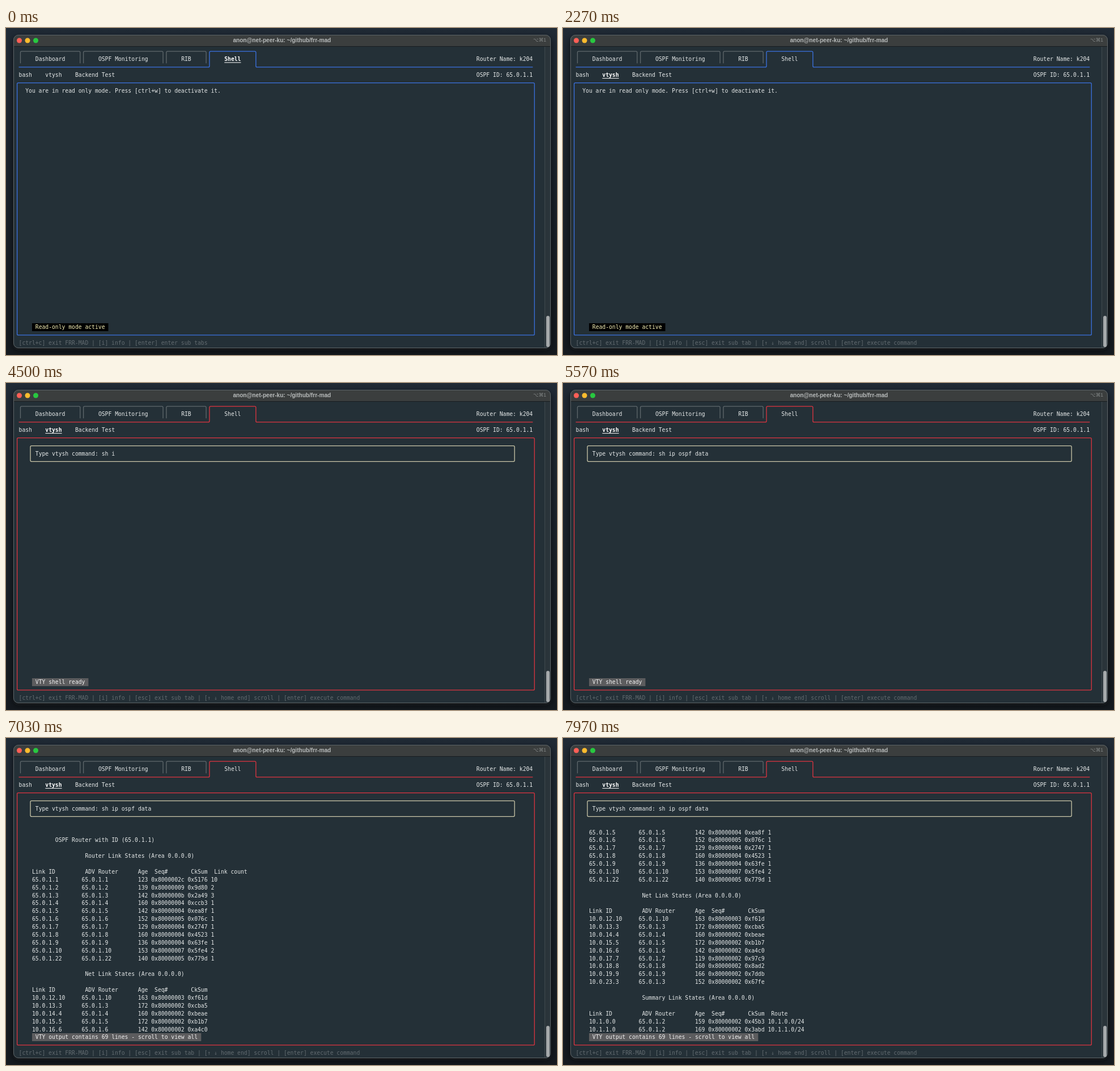
Write an HTML page that moves like this. It is 972 px wide and 576 px high and loops after 8 s.

```html
<!DOCTYPE html>
<html lang="en">
<head>
<meta charset="utf-8">
<title>Router shell</title>
<style>
html, body { margin: 0; width: 100%; height: 100%; overflow: hidden; background: #1b2229; }
svg { display: block; width: 100vw; height: 100vh; }
text { white-space: pre; fill: #e6e9e9; font: 9.717px "DejaVu Sans Mono", monospace; }
.active { font-weight: bold; fill: #fff; }
.dim { fill: #626b70; }
.title { font: bold 10.1px "Liberation Sans", sans-serif; fill: #b7baba; }
.keys { font: 8.5px "Liberation Sans", "DejaVu Sans", sans-serif; fill: #858989; }
.line { fill: none; stroke-width: 1.3; }
</style>
</head>
<body>
<svg id="stage" viewBox="0 0 972 576">
  <defs>
    <linearGradient id="desk" x2="0" y2="1">
      <stop offset="0" stop-color="#202a35"/>
      <stop offset="1" stop-color="#151a1f"/>
    </linearGradient>
    <filter id="blur" x="-5%" y="-5%" width="110%" height="112%"><feGaussianBlur stdDeviation="6"/></filter>
    <clipPath id="win"><rect x="13" y="12" width="948" height="552" rx="9"/></clipPath>
  </defs>
  <rect width="972" height="576" fill="url(#desk)"/>
  <rect x="12" y="16" width="950" height="552" rx="10" fill="#0a0d10" opacity=".6" filter="url(#blur)"/>
  <g clip-path="url(#win)">
    <rect x="13" y="12" width="948" height="552" fill="#243037"/>
    <rect x="13" y="12" width="948" height="20" fill="#3b3e3e"/>
    <rect x="13" y="32" width="948" height="1" fill="#171c1f"/>
    <rect x="950" y="33" width="11" height="531" fill="#2a343a"/>
    <rect x="950" y="33" width="1" height="531" fill="#3f494e"/>
  </g>
  <rect x="13.5" y="12.5" width="947" height="551" rx="8.5" fill="none" stroke="#5d6467"/>
  <circle cx="23.5" cy="22" r="4.5" fill="#ff5f57"/>
  <circle cx="38" cy="22" r="4.5" fill="#febc2e"/>
  <circle cx="52.5" cy="22" r="4.5" fill="#28c840"/>
  <text class="title" x="486.8" y="25" text-anchor="middle">anon@net-peer-ku: ~/github/frr-mad</text>
  <text class="keys" x="953" y="24" text-anchor="end">⌥⌘1</text>
  <rect x="953" y="507" width="6" height="55" rx="3" fill="#a5a9ab"/>
</svg>
<script>
const NS = 'http://www.w3.org/2000/svg';
const stage = document.getElementById('stage');
const CW = 5.85, RH = 13.88;
const colX = c => 22.55 + c * CW;
const rowY = r => 41.2 + r * RH;

function add(tag, attrs) {
  const el = document.createElementNS(NS, tag);
  for (const k in attrs) el.setAttribute(k, attrs[k]);
  return stage.appendChild(el);
}
function text(col, row, str = '', cls = '') {
  const el = add('text', { x: colX(col), y: rowY(row) + 3.4, class: cls });
  el.textContent = str;
  return el;
}
function frame(c0, r0, c1, r1, stroke) {
  return add('rect', {
    x: colX(c0), y: rowY(r0), width: (c1 - c0) * CW, height: (r1 - r0) * RH,
    rx: 2, class: 'line', stroke
  });
}
// A label that can be bold and underlined
function tab(col, row, str) {
  const label = text(col, row, str);
  const rule = add('rect', {
    x: colX(col), y: rowY(row) + 5.3, width: str.length * CW, height: 1, fill: '#fff'
  });
  return on => {
    label.setAttribute('class', on ? 'active' : '');
    rule.style.display = on ? '' : 'none';
  };
}

// Header
for (const [a, b] of [[.5, 18.5], [19.5, 43.5], [44.5, 56.5]]) {
  const l = colX(a), r = colX(b), y = rowY(0);
  add('path', {
    d: `M${l} ${y + 21}V${y + 2}q0 -2 2 -2H${r - 2}q2 0 2 2V${y + 21}`,
    class: 'line', stroke: '#5f686c'
  });
}
text(5, 1, 'Dashboard');
text(24, 1, 'OSPF Monitoring');
text(49, 1, 'RIB');
text(138, 1, 'Router Name: k204');
text(138, 3, 'OSPF ID: 65.0.1.1');
text(17, 3, 'Backend Test');
const shellTab = tab(62, 1, 'Shell');
const bashTab = tab(0, 3, 'bash');
const vtyTab = tab(8, 3, 'vtysh');

const top0 = rowY(0), base = rowY(2), left = colX(57.5), right = colX(71.5);
const accents = [
  add('path', {
    d: `M${colX(0)} ${base}H${left - 2}q2 0 2 -2V${top0 + 2}q0 -2 2 -2H${right - 2}` +
       `q2 0 2 2V${base - 2}q0 2 2 2H${colX(155)}`,
    class: 'line'
  }),
  frame(-.5, 4, 155.5, 36)
];

// Body
const notice = text(2, 5, 'You are in read only mode. Press [ctrl+w] to deactivate it.');
const inputBox = frame(3.5, 5, 149.5, 7, '#cbc7a9');
const prompt = text(5, 6);
const statusBox = add('rect', { x: colX(4), y: rowY(35) - 7, height: 14 });
const status = text(5, 35);
const footer = text(0, 37, '', 'dim');
const VIEW = 26;
const view = Array.from({ length: VIEW }, (_, i) => text(4, 9 + i));

// Router output
const head = extra => 'Link ID         ADV Router      Age  Seq#       CkSum  ' + extra;
const row = (id, adv, age, seq, sum, extra = '') =>
  `${id.padEnd(15)}${adv.padEnd(15)}  ${age} 0x800000${seq} 0x${sum} ${extra}`;
const section = name => ' '.repeat(16) + name + ' Link States (Area 0.0.0.0)';
const parse = (data, make) => data.split(',').map(s => make(...s.trim().split(' ')));

const routers = parse(`1 123 2c 5176 10, 2 139 09 9d80 2, 3 142 0b 2a49 3, 4 160 04 ccb3 1,
  5 142 04 ea8f 1, 6 152 05 076c 1, 7 129 04 2747 1, 8 160 04 4523 1,
  9 136 04 63fe 1, 10 153 07 5fe4 2, 22 140 05 779d 1`,
  (n, ...rest) => row('65.0.1.' + n, '65.0.1.' + n, ...rest));
const nets = parse(`12.10 163 03 f61d, 13.3 172 02 cba5, 14.4 160 02 beae, 15.5 172 02 b1b7,
  16.6 142 02 a4c0, 17.7 119 02 97c9, 18.8 160 02 8ad2, 19.9 166 02 7ddb, 23.3 152 02 67fe`,
  (n, ...rest) => row('10.0.' + n, '65.0.1.' + n.split('.')[1], ...rest));
const summaries = parse('0 159 02 45b3, 1 169 02 3abd',
  (n, ...rest) => row(`10.1.${n}.0`, '65.0.1.2', ...rest, `10.1.${n}.0/24`));
const output = [
  '', ' '.repeat(7) + 'OSPF Router with ID (65.0.1.1)', '',
  section('Router'), '', head('Link count'), ...routers, '',
  section('Net'), '', head(''), ...nets, '',
  section('Summary'), '', head('Route'), ...summaries
];

// Timeline in ms
const LOOP = 8000, ENTER = 1300, NEXT = 1730, UNLOCK = 3070, RUN = 5900, SCROLL = 7530;
const words = [['sh', 4230, 70], ['ip', 4500, 130], ['ospf', 4800, 100], ['data', 5300, 90]];
const typed = t => words
  .map(([w, start, gap]) => t < start ? '' : w.slice(0, Math.floor((t - start) / gap) + 1))
  .join(' ').trimEnd();
const show = (el, on) => { el.style.display = on ? '' : 'none'; };

function update(t) {
  const entered = t >= ENTER, open = t >= UNLOCK, ran = t >= RUN;
  shellTab(!entered);
  bashTab(entered && t < NEXT);
  vtyTab(t >= NEXT);
  accents.forEach(el => el.setAttribute('stroke', open ? '#df3440' : '#3b72e2'));

  show(notice, !open);
  show(inputBox, open);
  prompt.textContent = open ? 'Type vtysh command: ' + typed(t) : '';

  const message = ran ? 'VTY output contains 69 lines - scroll to view all'
    : open ? 'VTY shell ready' : 'Read-only mode active';
  status.textContent = message;
  status.style.fill = open ? '#f2f2f2' : '#f4efb6';
  statusBox.setAttribute('width', (message.length + 2) * CW);
  statusBox.setAttribute('fill', open ? '#5c5c5e' : '#000');

  footer.textContent = '[ctrl+c] exit FRR-MAD | [i] info | ' + (entered
    ? '[esc] exit sub tab | [↑ ↓ home end] scroll | [enter] execute command'
    : '[enter] enter sub tabs');

  const offset = t >= SCROLL ? 10 : 0;
  view.forEach((el, i) => { el.textContent = ran ? output[i + offset] : ''; });
}

const start = performance.now();
function tick() {
  update((performance.now() - start) % LOOP);
  requestAnimationFrame(tick);
}
update(0);
requestAnimationFrame(tick);
</script>
</body>
</html>
```
